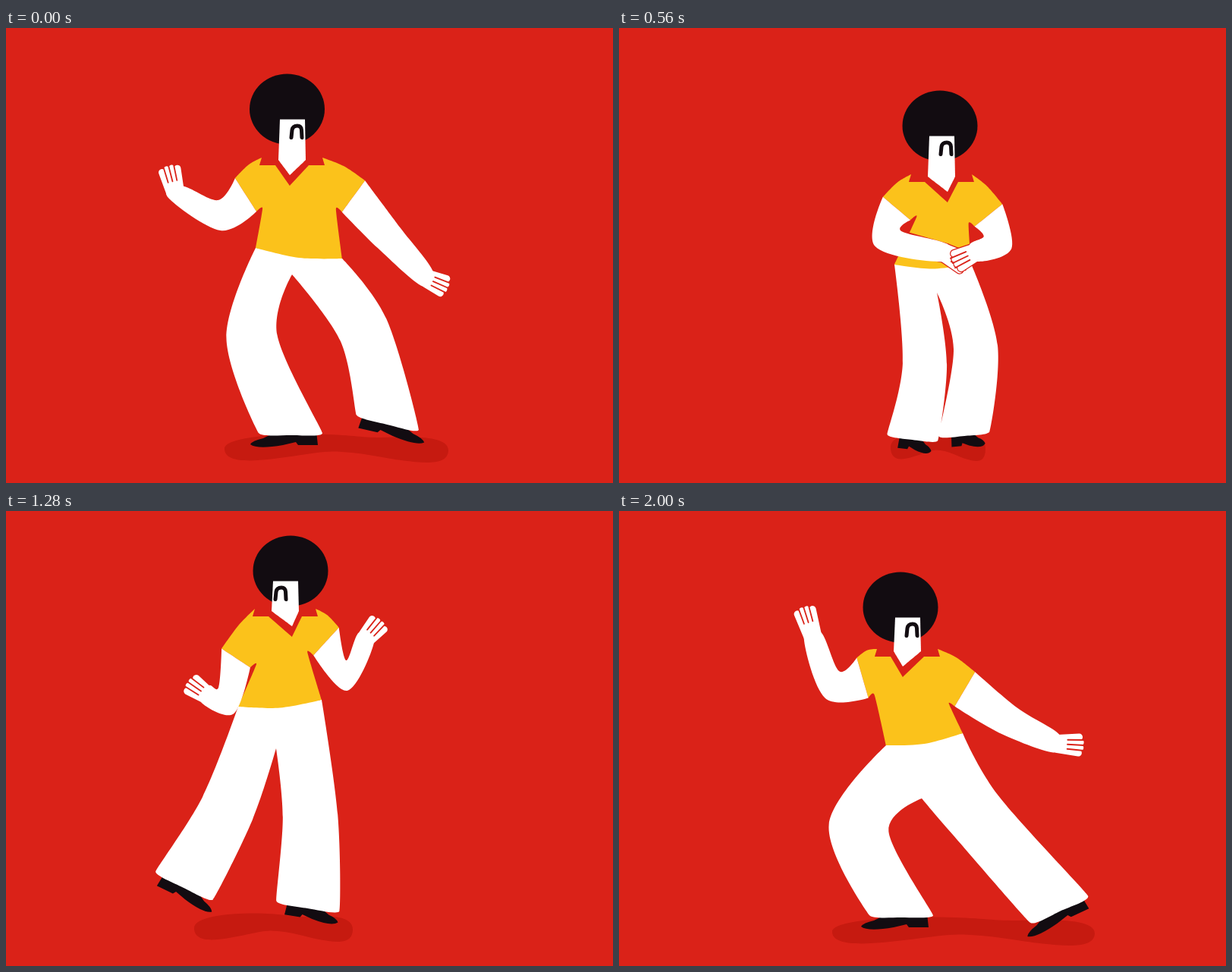
An HTML page with a canvas for the animation above (2080 ms loop, 800 by 600 pixels).

```html
<!DOCTYPE html>
<html lang="en">
<head>
<meta charset="utf-8">
<title>Disco dancer</title>
<style>
  html, body { margin: 0; width: 100%; height: 100%; overflow: hidden; background: #da2218; }
  canvas { display: block; }
</style>
</head>
<body>
<canvas id="stage" width="800" height="600"></canvas>
<script>
const ctx = document.getElementById('stage').getContext('2d');
const RED = '#da2218', SHADE = '#c61a10', YELLOW = '#fbc21b', BLACK = '#120c11', WHITE = '#fff';
const LOOP = 2080, STEP = 80, MIRROR = 785;

// Joints of the dancer. Arms run shoulder, elbow, wrist, fingertips.
// gaze: chin offset and nose side; sole: tilt in degrees and how far the toe turns sideways.
const point = {
  head: [370.5, 107], neck: [377, 208], gaze: [-3, 1], crotch: [377, 325],
  waistL: [329, 290], waistR: [443, 304],
  armL: [316,220, 281,247, 223,216, 214,181], armR: [458,222, 505,277, 556,331, 583,343],
  kneeL: [324, 407], footL: [375, 534], soleL: [0, -1],
  kneeR: [471, 398], footR: [503, 520], soleR: [13, 1],
  shadowL: [288, 555], shadowR: [583, 555]
};

const lungeLow = {
  head: [371, 127], neck: [380, 219], gaze: [-6, 1], crotch: [399, 379],
  waistL: [352, 309], waistR: [453, 293],
  armL: [321,220, 281,229, 255,164, 243,126], armR: [456,235, 515,277, 578,307, 613,309],
  kneeL: [316, 418], footL: [372, 533], soleL: [0, -1],
  kneeR: [469, 400], footR: [580, 525], soleR: [-25, -1],
  shadowL: [281, 555], shadowR: [627, 555]
};

const lunge = { ...lungeLow, armR: [456,235, 500,265, 565,260, 604,264] };

const clasp = {
  head: [423, 129], neck: [425, 230], gaze: [8, 1], crotch: [419, 349],
  waistL: [363, 312], waistR: [464, 311],
  armL: [366,238, 355,278, 430,297, 460,313], armR: [487,247, 499,283, 467,297, 440,310],
  kneeL: [403, 443], footL: [387, 540], soleL: [7, .5],
  kneeR: [470, 421], footR: [455, 535], soleR: [-5, .5],
  shadowL: [358, 553], shadowR: [483, 553]
};

const reach = {
  head: [414.5, 130], neck: [403, 222], gaze: [5, -1], crotch: [386, 370],
  waistL: [334, 303], waistR: [442, 314],
  armL: [325,233, 272,284, 200,323, 170,333], armR: [465,228, 506,239, 544,187, 551,147],
  kneeL: [291, 437], footL: [241, 533], soleL: [0, .4],
  kneeR: [466, 425], footR: [410, 533], soleR: [0, 1],
  shadowL: [173, 555], shadowR: [500, 555]
};

const stride = {
  head: [375, 79], neck: [368, 166], gaze: [9, -1], crotch: [356, 313],
  waistL: [306, 258], waistR: [416, 249],
  armL: [303,194, 290,250, 262,241, 239,225], armR: [422,172, 449,217, 475,167, 495,144],
  kneeL: [292, 392], footL: [235, 494], soleL: [26, .9],
  kneeR: [401, 402], footR: [398, 521], soleR: [9, .8],
  shadowL: [248, 550], shadowR: [457, 550]
};

const stand = {
  head: [368, 104], neck: [371, 194], gaze: [0, 0], crotch: [378, 315],
  waistL: [327, 268], waistR: [426, 276],
  armL: [312,204, 272,255, 269,322, 279,353], armR: [434,215, 448,268, 438,338, 420,372],
  kneeL: [336, 410], footL: [341, 537], soleL: [-3, -.6],
  kneeR: [422, 410], footR: [431, 528], soleR: [7, .8],
  shadowL: [300, 554], shadowR: [487, 554]
};

function flip(pose) {
  const out = {};
  for (const name in pose) {
    const twin = name.replace(/[LR]$/, s => s === 'L' ? 'R' : 'L');
    const signed = /gaze|sole/.test(name);
    out[twin] = pose[name].map((v, i) => signed ? -v : i % 2 ? v : MIRROR - v);
  }
  return out;
}

const keys = [
  [0, point], [240, lunge], [320, flip(stride)], [560, clasp], [720, flip(stand)],
  [960, reach], [1040, flip(point)], [1200, flip(lunge)], [1280, stride],
  [1520, flip(clasp)], [1680, stand], [1920, flip(reach)], [2000, lungeLow], [LOOP, point]
];

function poseAt(t) {
  const k = keys.findIndex(key => key[0] > t);
  const [t0, a] = keys[k - 1], [t1, b] = keys[k];
  const u = (t - t0) / (t1 - t0), out = {};
  for (const name in a) out[name] = a[name].map((v, i) => v + (b[name][i] - v) * u);
  return out;
}

const add = ([x, y], [dx, dy], k = 1) => [x + dx * k, y + dy * k];
const mix = (a, b, u = .5) => [a[0] + (b[0] - a[0]) * u, a[1] + (b[1] - a[1]) * u];
const soft = (p, amount = 1) => [p[0], p[1], amount];

function unit(a, b) {
  const dx = b[0] - a[0], dy = b[1] - a[1], len = Math.hypot(dx, dy) || 1;
  return [dx / len, dy / len];
}

// Unit vector across a bent limb a-b-c at its joint b.
function across(a, b, c) {
  const [dx, dy] = unit([0, 0], add(unit(a, b), unit(b, c)));
  return [dy, -dx];
}

// Closed outline; a point's third value is its softness, 0 being a corner.
function fillShape(pts, color) {
  const n = pts.length, at = i => pts[(i + n) % n];
  const handle = (i, dir) => {
    const [px, py] = at(i - 1), [nx, ny] = at(i + 1);
    return add(at(i), [nx - px, ny - py], dir * (at(i)[2] || 0) / 6);
  };
  ctx.beginPath();
  ctx.moveTo(...pts[0].slice(0, 2));
  for (let i = 0; i < n; i++) {
    ctx.bezierCurveTo(...handle(i, 1), ...handle(i + 1, -1), ...at(i + 1).slice(0, 2));
  }
  ctx.fillStyle = color;
  ctx.fill();
}

function strokeLines(lines, color, width) {
  ctx.beginPath();
  for (const line of lines) line.forEach((p, i) => i ? ctx.lineTo(...p) : ctx.moveTo(...p));
  ctx.strokeStyle = color;
  ctx.lineWidth = width;
  ctx.stroke();
}

// side is -1 for the left arm and 1 for the right one.
function makeArm(list, neck, side) {
  const [shoulder, elbow, wrist, tip] = [0, 2, 4, 6].map(i => list.slice(i, i + 2));
  const edge = across(add(neck, [0, -20]), shoulder, elbow);
  const bend = across(shoulder, elbow, wrist), cuff = across(elbow, wrist, tip);
  const half = side * (16 + 12 * Math.abs(edge[1]));
  const top = add(shoulder, edge, half), bottom = add(shoulder, edge, -half);
  const outline = [
    top, soft(add(elbow, bend, 20 * side)), soft(add(wrist, cuff, 12 * side)),
    soft(add(wrist, cuff, -12 * side)), soft(add(elbow, bend, -20 * side)), bottom
  ];
  const dir = unit(wrist, tip), palm = [dir[1], -dir[0]];
  const fingers = [-1.5, -.5, .5, 1.5].map(i => [
    add(wrist, palm, i * 5),
    add(add(tip, dir, -4 - Math.abs(i) * 2), palm, i * 7)
  ]);
  const slits = [-1, 0, 1].map(i => [add(tip, palm, i * 7), add(add(tip, dir, -22), palm, i * 6)]);
  return { top, bottom, outline, fingers, slits };
}

function drawArm(arm) {
  strokeLines([arm.outline.slice(1, 3).map(p => p.slice(0, 2)),
    arm.outline.slice(3, 5).map(p => p.slice(0, 2))], RED, 2.5);
  strokeLines(arm.fingers, RED, 11.5);
  fillShape(arm.outline, WHITE);
  strokeLines(arm.fingers, WHITE, 9);
  strokeLines(arm.slits, RED, 1.8);
}

function drawShirt(p, left, right) {
  const [x, y] = p.neck;
  const collar = side => [[40, -37], [43, -27], [22, -27]].map(([dx, dy]) => [x + side * dx, y + dy]);
  const collarL = collar(-1), collarR = collar(1).reverse();
  const ridge = (a, b) => soft(add(mix(a, b), [0, -4]));
  const pit = (arm, side) => soft(add(arm.bottom, [-8 * side, -4]), .6);
  fillShape([
    left.top, ridge(left.top, collarL[0]), ...collarL, [x + p.gaze[0], y],
    ...collarR, ridge(collarR[2], right.top), right.top, right.bottom, pit(right, 1),
    p.waistR, soft(add(mix(p.waistL, p.waistR), [0, 6])), p.waistL, pit(left, -1), left.bottom
  ], YELLOW);
}

// Outline of one trouser leg from its left edge round to its right edge.
function makeLeg(waist, crotch, knee, foot, tilt, gap) {
  const kneeHalf = 24 + gap * .075, hemHalf = Math.min(42, 20 + gap * .2);
  const n = across(mix(waist, crotch), knee, foot);
  const a = tilt * Math.PI / 180, hem = [Math.cos(a), Math.sin(a)];
  return [
    soft(add(knee, n, -kneeHalf)), soft(add(foot, hem, -hemHalf), .25),
    soft(add(foot, [-hem[1], hem[0]], 3)),
    soft(add(foot, hem, hemHalf), .25), soft(add(knee, n, kneeHalf))
  ];
}

function drawPants(p) {
  const gap = p.footR[0] - p.footL[0];
  fillShape([
    p.waistL, ...makeLeg(p.waistL, p.crotch, p.kneeL, p.footL, p.soleL[0], gap),
    p.crotch, ...makeLeg(p.waistR, p.crotch, p.kneeR, p.footR, p.soleR[0], gap), p.waistR
  ], WHITE);
}

const SHOE = new Path2D('M-34 -2 L-36 16 L-10 16 L-7 12 L10 16 Q44 22 53 15 Q50 10 36 7 L18 -2 Z');
function drawShoe([x, y], [tilt, turn]) {
  ctx.save();
  ctx.translate(x, y);
  ctx.rotate(tilt * Math.PI / 180);
  ctx.scale(turn, 1);
  ctx.fillStyle = BLACK;
  ctx.fill(SHOE);
  ctx.restore();
}

const SHADOW = new Path2D(
  'M0 0 C0 -.4 .2 -.54 .38 -.54 S.6 -.4 .7 -.42 S1 -.55 1 .05 S.88 .5 .8 .43 S.6 .1 .48 .1 S0 .9 0 0');
function drawShadow([x0, y], [x1]) {
  ctx.save();
  ctx.translate(x0, y);
  ctx.scale(x1 - x0, 36);
  ctx.fillStyle = SHADE;
  ctx.fill(SHADOW);
  ctx.restore();
}

const NOSE = new Path2D('M-7 8 L-6 -2 Q-5 -7.5 1 -7.5 Q6 -7.5 6.5 -2 L7 8');
function drawHead({ head: [hx, hy], neck: [x, y], gaze: [chin, look] }) {
  ctx.fillStyle = BLACK;
  ctx.beginPath();
  ctx.ellipse(hx, hy, 49.5, 46.5, 0, 0, 2 * Math.PI);
  ctx.fill();
  const top = hy + 13.5, jaw = y - 34;
  fillShape([[x - 16, top], [x + 17, top], [x + 18, jaw], [x + chin, y - 14], [x - 18, jaw]], WHITE);
  ctx.save();
  ctx.translate(x + look * 6, hy + 29.5);
  ctx.strokeStyle = BLACK;
  ctx.lineWidth = 5;
  ctx.stroke(NOSE);
  ctx.restore();
}

function draw(p) {
  ctx.fillStyle = RED;
  ctx.fillRect(0, 0, 800, 600);
  ctx.lineCap = 'round';
  const left = makeArm(p.armL, p.neck, -1), right = makeArm(p.armR, p.neck, 1);
  drawShadow(p.shadowL, p.shadowR);
  drawShoe(p.footL, p.soleL);
  drawShoe(p.footR, p.soleR);
  drawPants(p);
  drawShirt(p, left, right);
  drawArm(left);
  drawArm(right);
  drawHead(p);
}

const start = performance.now();
function tick() {
  const t = (performance.now() - start) % LOOP;
  draw(poseAt(Math.floor(t / STEP) * STEP));
  requestAnimationFrame(tick);
}
tick();
</script>
</body>
</html>
```
